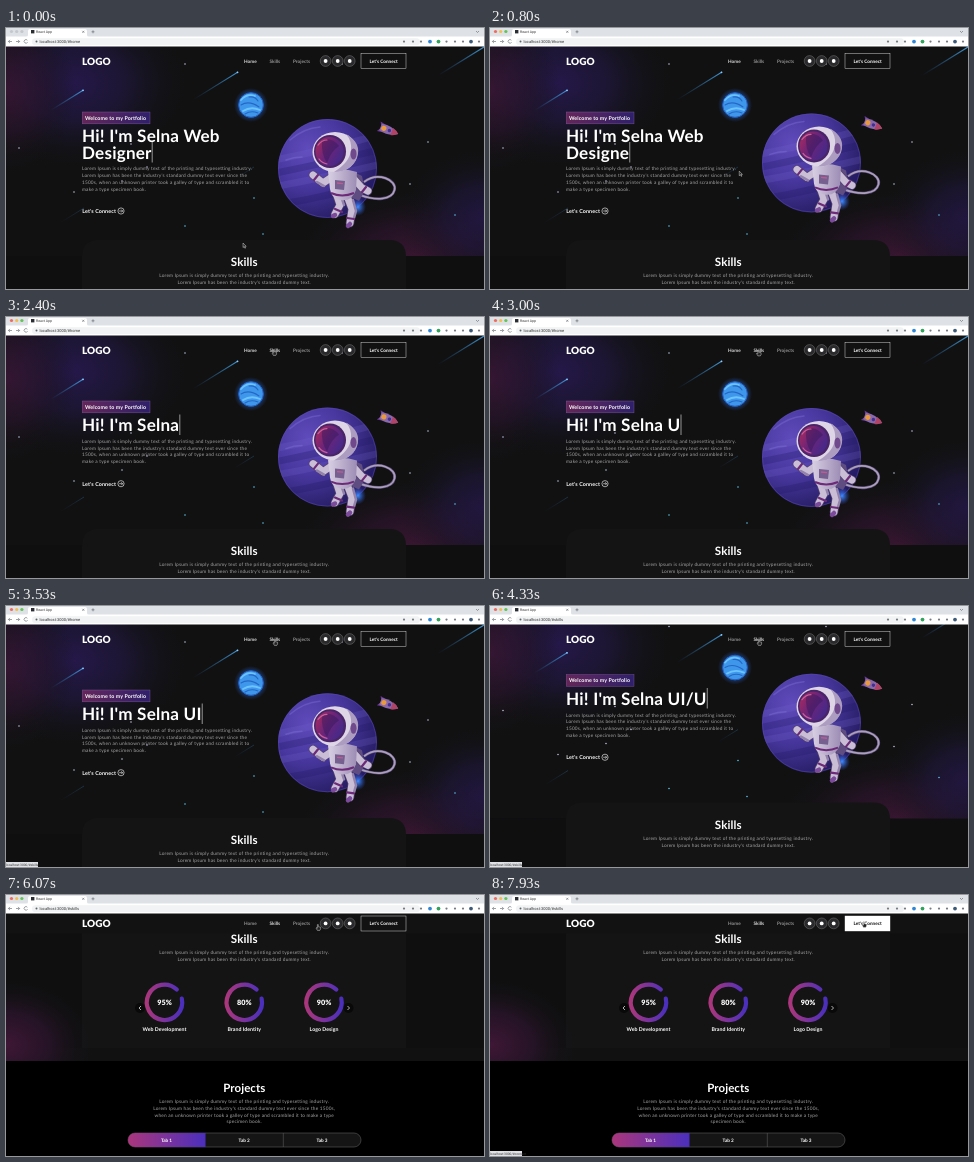
Write an HTML page that moves like this. It is 478 px wide and 261 px high and loops after 8 s.

```html
<!DOCTYPE html>
<html lang="en">
<head>
<meta charset="utf-8">
<title>Portfolio</title>
<style>
html, body { margin: 0; width: 100%; height: 100%; overflow: hidden; background: #0d0d0e; }
svg { display: block; width: 100vw; height: 100vh; }
text { font-family: Lato, "Open Sans", sans-serif; text-rendering: geometricPrecision; white-space: pre; }
.ui text { font-family: Roboto, Arial, sans-serif; }
</style>
</head>
<body>
<svg viewBox="0 0 478 261" preserveAspectRatio="none">
<defs>
  <linearGradient id="brand"><stop stop-color="#aa367c"/><stop offset="1" stop-color="#4a2fbd"/></linearGradient>
  <radialGradient id="violet"><stop stop-color="#25184a"/><stop offset=".45" stop-color="#1f173a" stop-opacity=".8"/><stop offset="1" stop-color="#121214" stop-opacity="0"/></radialGradient>
  <radialGradient id="plum"><stop stop-color="#3f1736"/><stop offset=".5" stop-color="#2a142b" stop-opacity=".8"/><stop offset="1" stop-color="#121214" stop-opacity="0"/></radialGradient>
  <radialGradient id="planet" cx=".3" cy=".3" r=".8"><stop stop-color="#5f4bbb"/><stop offset=".5" stop-color="#46369c"/><stop offset="1" stop-color="#221a5c"/></radialGradient>
  <linearGradient id="visor" x1="0" y1=".2" x2="1" y2=".8"><stop stop-color="#a42a60"/><stop offset=".45" stop-color="#6b2478"/><stop offset="1" stop-color="#3f2a8c"/></linearGradient>
  <linearGradient id="suit"><stop stop-color="#d9d0e4"/><stop offset="1" stop-color="#9c8cb4"/></linearGradient>
  <radialGradient id="halo"><stop offset=".6" stop-color="#2a6ce0" stop-opacity=".5"/><stop offset="1" stop-color="#2a6ce0" stop-opacity="0"/></radialGradient>
  <radialGradient id="jet"><stop stop-color="#3f8cff"/><stop offset="1" stop-color="#2a50d0" stop-opacity="0"/></radialGradient>
  <linearGradient id="tail" x1="0" y1="1" x2="1" y2="0"><stop stop-color="#2b6ca8" stop-opacity="0"/><stop offset="1" stop-color="#45a6e8"/></linearGradient>
  <clipPath id="disc"><circle cx="321.5" cy="140.5" r="49.5"/></clipPath>
  <clipPath id="hero"><path d="M0 0H478V228H0Z"/></clipPath>
</defs>

<g id="page">
  <path d="M0 0H478V228H0Z" fill="#111112"/>
  <path d="M0 228H478V356H0Z" fill="#0f0f10"/>
  <g clip-path="url(#hero)">
    <ellipse cx="68" cy="55" rx="115" ry="85" fill="url(#violet)"/>
    <ellipse cx="0" cy="62" rx="70" ry="85" fill="url(#plum)" opacity=".75"/>
    <ellipse cx="410" cy="228" rx="120" ry="66" fill="url(#plum)" opacity=".85"/>
    <ellipse cx="478" cy="190" rx="85" ry="70" fill="url(#violet)" opacity=".8"/>
    <g id="sky"></g>
  </g>
  <circle cx="245" cy="77" r="17" fill="url(#halo)"/>
  <circle cx="245" cy="77" r="12.3" fill="#3f97ec" stroke="#245fc4"/>
  <g fill="none" stroke-linecap="round">
    <path d="M235 72q6-7 14-4M237 83q8-5 17-1" stroke="#6cc4ff" stroke-width="1.8"/>
    <path d="M235 77q8-5 18 2M239 86q6-4 13-1M243 69q6-1 9 4" stroke="#2567c4" stroke-width="1.1"/>
  </g>

  <g id="float">
    <circle cx="321.5" cy="140.5" r="49.5" fill="url(#planet)"/>
    <g clip-path="url(#disc)" fill="none" stroke-linecap="round">
      <path d="M268 132q45-8 108-26M272 158q45-8 104-22" stroke="#7a68d0" stroke-opacity=".2" stroke-width="7"/>
      <path d="M270 145q50-10 106-24M276 176q50-8 100-24" stroke="#1d1660" stroke-opacity=".28" stroke-width="7"/>
      <path d="M284 112q14-12 30-13M280 132q8-3 16-3" stroke="#8a78e0" stroke-opacity=".35" stroke-width="1.5"/>
    </g>
    <circle cx="321.5" cy="140.5" r="49" fill="none" stroke="#5a48b4" stroke-opacity=".5"/>
    <ellipse cx="352" cy="179" rx="8" ry="9" fill="url(#jet)"/>
    <!-- hose -->
    <g fill="none">
      <path id="hose" d="M358 154C372 143 391 152 388.500 162C386 172 370 173 354 167" stroke="#5d4a78" stroke-width="2.8"/>
      <path d="M358 154C372 143 391 152 388.500 162C386 172 370 173 354 167" stroke="#aa9fbc" stroke-width="1.7"/>
    </g>
    <!-- astronaut -->
    <path d="M346 143l10 5 3 15-6 10-9-4Z" fill="#5f4c80"/>
    <g fill="none" stroke-linecap="round" stroke-linejoin="round">
      <path d="M331 168L334 177L329 186M341 168L346 181L344 195M326 149L317 155L307 147M348 151L356 160L362 163" stroke="#54406f" stroke-width="8.500"/>
      <path d="M331 168L334 177L329 186M341 168L346 181L344 195M326 149L317 155L307 147M348 151L356 160L362 163" stroke="#c9bed6" stroke-width="7"/>
      <path d="M336 171L338 177M347 172L350 183L348 190M318 158L311 154" stroke="#9383ab" stroke-width="2.500"/>
      <path d="M329 181l7 3M341 190l7 1M308 152l4-5M356 164l4-5" stroke="#6d2a78" stroke-width="2.200"/>
      <path d="M329 187l-2 1M344 196l-2 2" stroke="#7b4a9a" stroke-width="4.500"/>
    </g>
    <path d="M322 143Q336 139 351 144L350 162Q346 174 334 172Q325 170 324 161Z" fill="url(#suit)"/>
    <path d="M329 152l10 1-1 9-9-1Z" fill="#75608f"/>
    <path d="M331 155l6 .6" stroke="#c25a92" stroke-width="1.300"/>
    <path d="M325 165q11 5 23 0" fill="none" stroke="#6d2a78" stroke-width="2"/>
    <ellipse cx="329" cy="124" rx="22.500" ry="20" fill="#ded5e6"/>
    <path d="M340 106Q356 115 351 130Q345 144 328 144Q344 134 345 122Q346 113 340 106Z" fill="#ac9cc0"/>
    <ellipse cx="347.500" cy="126" rx="3" ry="5.500" fill="#70488c"/>
    <ellipse cx="324" cy="123.500" rx="16" ry="16.500" fill="#4a2468"/>
    <ellipse cx="323.500" cy="123.500" rx="14" ry="14.500" fill="url(#visor)"/>
    <path d="M316 113q9-5 17 5-8 5-12 17-6-9-5-22Z" fill="#34185c" opacity=".45"/>
    <path d="M312 117q4-5 9-5M313 131q3 4 8 5" stroke="#c8609a" stroke-width="1.200" fill="none" stroke-linecap="round"/>
    <!-- rocket -->
    <g transform="translate(382 102) rotate(22)">
      <path d="M-4-4l-6-1 3 5-3 5 6-1Z" fill="#6a3a94"/>
      <path d="M-8-3.500Q3-6 11 0Q3 6-8 3.500Z" fill="#8a68ac"/>
      <path d="M4-3.800Q8-3 11 0Q8 3 4 3.800Z" fill="#b04468"/>
      <circle cx="-4.500" r="2.600" fill="#e89a3c"/>
      <circle cx="1.500" r="1.700" fill="#43308c"/>
    </g>
  </g>

  <rect x="76.3" y="84" width="67.7" height="11.8" fill="url(#brand)" fill-opacity=".5" stroke="#a070c0" stroke-opacity=".6" stroke-width=".5"/>
  <g id="tagline"></g>
  <g id="heading"></g>
  <path id="caret" d="M0 97.5V118" stroke="#777" stroke-width="1.3"/>
  <g id="intro">
    <g fill="none" stroke="#fff" stroke-width=".6"><circle cx="115" cy="183" r="3.1"/><path d="M113.2 183h3.4m-1.3-1.4l1.4 1.4-1.4 1.4"/></g>
  </g>

  <path d="M76 356V229Q76 212 93 212H383Q400 212 400 229V343H76Z" fill="#141415"/>
  <path d="M0 343H478V356H0Z" fill="#111112"/>
  <svg y="228" width="478" height="128" viewBox="0 228 478 128"><ellipse cx="0" cy="340" rx="88" ry="66" fill="url(#plum)"/></svg>
  <g id="skills"></g>
  <path d="M0 356H478V560H0Z" fill="#000"/>
  <g id="projects">
    <rect x="122" y="428" width="233" height="14" rx="7" fill="#151515" stroke="#5c5c5c" stroke-width=".6"/>
    <path d="M199.5 428H129a7 7 0 0 0 0 14h70.5Z" fill="url(#brand)"/>
    <path d="M277.3 428v14" stroke="#5c5c5c" stroke-width=".6"/>
  </g>
</g>

<path id="bar" d="M0 18H478V38.5H0Z" fill="#121212"/>
<g id="nav">
  <rect x="355" y="25.6" width="45" height="15" fill="none" stroke="#fff" stroke-width=".4"/>
  <rect id="fill" x="355" y="25.6" width="0" height="15" fill="#fff"/>
</g>

<g class="ui" id="chrome">
  <path d="M0 0H478V9H0Z" fill="#dee1e6"/>
  <path d="M0 8.6H478V18.6H0Z" fill="#fff"/>
  <path d="M20 9Q22 9 22 7V3Q22 1 24 1H79Q81 1 81 3V7Q81 9 83 9Z" fill="#fff"/>
  <g id="lights"><circle cx="5.5" cy="3.5" r="1.6"/><circle cx="10.7" cy="3.5" r="1.6"/><circle cx="15.9" cy="3.5" r="1.6"/></g>
  <rect x="25" y="2" width="3.4" height="3.4" fill="#2a2d34"/>
  <path d="M76.3 2.8l2 2m0-2l-2 2M85.5 3.8h3m-1.5-1.5v3M470 3l1.5 1.5L473 3M6 13.5H2.5m1.5-1.6l-1.6 1.6 1.6 1.6M10 13.5h3.5m-1.5-1.6l1.6 1.6-1.6 1.6M21.4 12.3a1.8 1.8 0 1 0 .2 1.8" fill="none" stroke="#5f6368" stroke-width=".6"/>
  <rect x="26" y="10.3" width="388" height="6.8" rx="3.4" fill="#f1f3f4"/>
  <circle cx="30.5" cy="13.6" r="1" fill="#5f6368"/>
  <g id="icons"></g>
</g>
<g class="ui" id="status"><path d="M0 256H32V261H0Z" fill="#dfe1e5"/></g>
<g id="pointer" stroke="#fff" stroke-width=".4" fill="#222">
  <path id="arrow" d="M0-2V2.6L1.1 1.6L1.9 3.3L2.6 3L1.8 1.3H3.2Z"/>
  <path id="hand" d="M-.6-2.4H.3V-.3L2.6.2V2L1.8 3.4H-.6L-2 1L-1.4.6L-.6 1.2Z"/>
</g>
</svg>

<script>
const $ = id => document.getElementById(id);
const NS = 'http://www.w3.org/2000/svg';

function add(parent, tag, attrs) {
  const el = document.createElementNS(NS, tag);
  for (const k in attrs) el.setAttribute(k, attrs[k]);
  return $(parent).appendChild(el);
}
function label(parent, x, y, size, str, attrs = {}) {
  const el = add(parent, 'text', { x, y, 'font-size': size, fill: '#fff', 'font-weight': 700, ...attrs });
  el.textContent = str;
  return el;
}
const mid = { 'text-anchor': 'middle' };
const body = { 'font-weight': 400, fill: '#a6a6a6', 'letter-spacing': .19 };
function lines(parent, x, y, rows, attrs) {
  rows.forEach((row, i) => label(parent, x, y + i * 6.7, 4.78, row, { ...body, ...attrs }));
}

// Sky
[[179,36],[125,116],[13,120],[141,139],[68,164],[116,153],[336,36],[422,114],[404,156]]
  .forEach(([cx, cy]) => add('sky', 'circle', { cx, cy, r: .7, fill: '#dce6ff' }));
[[248,170],[257,206],[179,198],[449,187]]
  .forEach(([cx, cy]) => add('sky', 'circle', { cx, cy, r: .8, fill: '#5fc4e8' }));
[[77.5,62,33],[232,44,45],[478,19,46],[248,139,20],[78,180,24]].forEach(([x, y, len], i) => {
  add('sky', 'path', { d: `M${x} ${y}l${-len} ${len * .62}`, stroke: 'url(#tail)', 'stroke-width': i < 3 ? 1.1 : .6, opacity: i < 3 ? .9 : .4 });
  if (i < 2) add('sky', 'circle', { cx: x - .5, cy: y + .3, r: .9, fill: '#8cc8ff' });
});

// Hero
const first = "Lorem Ipsum is simply dummy text of the printing and typesetting industry.";
const second = "Lorem Ipsum has been the industry's standard dummy text";
label('tagline', 79, 91.7, 5.3, 'Welcome to my Portfolio', { 'letter-spacing': .1 });
const h1 = [114, 130.5].map(y => label('heading', 76, y, 17.1, '', { 'letter-spacing': .2 }));
lines('intro', 76, 142.4, [first, second + ' ever since the',
  '1500s, when an unknown printer took a galley of type and scrambled it to', 'make a type specimen book.']);
label('intro', 76.3, 184.9, 5.4, "Let's Connect", { 'letter-spacing': .1 });

// Skills
label('skills', 238.3, 238, 11.6, 'Skills', { ...mid, 'letter-spacing': .1 });
lines('skills', 238.2, 249.4, [first, second + '.'], mid);
[['95%', 'Web Development', 158.5], ['80%', 'Brand Identity', 238.3], ['90%', 'Logo Design', 318]].forEach(([num, name, x]) => {
  const at = deg => [x + 17.7 * Math.cos(deg * Math.PI / 180), 297.3 + 17.7 * Math.sin(deg * Math.PI / 180)].join(' ');
  add('skills', 'path', { d: `M${at(-12)}A17.7 17.7 0 1 1 ${at(-46)}`, fill: 'none', stroke: 'url(#brand)', 'stroke-width': 4.2, 'stroke-linecap': 'round' });
  label('skills', x, 299.8, 7.3, num, { ...mid, 'font-weight': 900 });
  label('skills', x, 326.2, 5.2, name, { ...mid, 'letter-spacing': .05 });
});
[[134, 1], [342.5, -1]].forEach(([x, s]) => {
  add('skills', 'circle', { cx: x, cy: 303, r: 5, fill: '#09090a' });
  add('skills', 'path', { d: `M${x + s} 301l${-2 * s} 2l${2 * s} 2`, fill: 'none', stroke: '#ddd', 'stroke-width': .8 });
});

// Projects
label('projects', 238.3, 387, 11.5, 'Projects', { ...mid, 'letter-spacing': .05 });
lines('projects', 238.2, 398.1, [first, second + ' ever since the 1500s,',
  'when an unknown printer took a galley of type and scrambled it to make a type', 'specimen book.'], mid);
[160.5, 238.2, 316].forEach((x, i) => label('projects', x, 436.8, 4.7, 'Tab ' + (i + 1), mid));

// Navigation
label('nav', 76, 36.6, 10, 'LOGO', { 'font-weight': 900 });
const [home, skillsLink] = [['Home', 238], ['Skills', 263.5], ['Projects', 287]]
  .map(([name, x]) => label('nav', x, 34.8, 4.7, name, { opacity: .55 }));
[319.6, 331.7, 343.7].forEach(cx => {
  add('nav', 'circle', { cx, cy: 33, r: 5.4, fill: '#2a2a2d', stroke: '#777', 'stroke-width': .5 });
  add('nav', 'circle', { cx, cy: 33, r: 1.9, fill: '#fff' });
});
const cta = label('nav', 377.6, 34.7, 4.7, "Let's Connect", mid);

// Browser
const plain = { 'font-weight': 400, fill: '#333' };
label('chrome', 30, 5, 3.5, 'React App', plain);
const url = label('chrome', 33.6, 15.1, 4, '', plain);
[[398],[407],[415],[424,'#2f86d6'],[432.5,'#2fa45a'],[440.5],[449],[457],[465,'#3c5a78'],[473]]
  .forEach(([x, fill = '#777b80']) => add('icons', 'circle', { cx: x, cy: 13.6, r: fill[1] == '7' ? 1.1 : 1.9, fill }));
const hint = label('status', 0, 259.8, 3.25, '', plain);

// Timing
const clamp = x => Math.max(0, Math.min(1, x));
const ease = x => (x = clamp(x), x < .5 ? 4 * x ** 3 : 1 - 4 * (1 - x) ** 3);
const smooth = x => (x = clamp(x), x * x * (3 - 2 * x));
const host = 'localhost:3000/#';
const path = [[0,237,217],[350,237,217],[1400,268,35],[2700,268,35],[3300,269,36],[4900,269,36],[5900,312,32],[6350,312,32],[7100,374,29],[8000,374,29]];

function pointerAt(t) {
  const i = path.findIndex((p, n) => n && t <= p[0]);
  const [a, b] = [path[i - 1], path[i]];
  const k = smooth((t - a[0]) / (b[0] - a[0]));
  return [a[1] + (b[1] - a[1]) * k, a[2] + (b[2] - a[2]) * k];
}

// Each deletion comes after half the previous wait; typing ticks every 500 ms.
function typed(t) {
  const u = t - 70, word = 'Web Designer';
  if (u < 0) return word;
  if (u < 2000) return word.slice(0, Math.max(0, 11 - Math.floor(-Math.log2(1 - u / 2000))));
  return 'UI/UX Designer'.slice(0, Math.floor((u - 2000) / 500));
}

function setHeading(t) {
  const full = "Hi! I'm Selna " + typed(t);
  h1[0].textContent = full.trimEnd();
  h1[1].textContent = '';
  const wrap = h1[0].getComputedTextLength() > 170;
  if (wrap) {
    const cut = full.lastIndexOf(' ');
    h1[0].textContent = full.slice(0, cut);
    h1[1].textContent = full.slice(cut + 1);
  }
  const x = 76.6 + h1[+wrap].getComputedTextLength();
  $('caret').setAttribute('transform', `translate(${x} ${wrap ? 16.5 : 0})`);
  $('intro').setAttribute('transform', `translate(0 ${wrap ? 0 : -16.3})`);
}

function draw(t) {
  setHeading(t);
  const phase = ((t / 1000 - 1.23) % 3 + 3) % 3;
  $('float').setAttribute('transform', `translate(0 ${-8.6 + 7 * Math.min(phase, 3 - phase)})`);

  $('page').setAttribute('transform', `translate(0 ${-190 * ease((t - 4140) / 700)})`);
  const stuck = smooth((t - 4320) / 320);
  $('nav').setAttribute('transform', `translate(0 ${-4.6 * stuck})`);
  $('bar').setAttribute('opacity', stuck);

  const [x, y] = pointerAt(t);
  const onSkills = y < 40 && x > 262 && x < 276, onButton = x > 356, clicked = t > 4100;
  home.setAttribute('opacity', clicked ? .55 : .85);
  skillsLink.setAttribute('opacity', clicked || onSkills ? .85 : .55);
  const fill = smooth((t - 6830) / 300);
  $('fill').setAttribute('width', 45 * fill);
  cta.setAttribute('fill', fill > .5 ? '#121212' : '#fff');

  $('pointer').setAttribute('transform', `translate(${x} ${y})`);
  const hand = onSkills || x > 311;
  $('hand').setAttribute('opacity', +hand);
  $('arrow').setAttribute('opacity', +!hand);

  url.textContent = host + (clicked ? 'skills' : 'home');
  hint.textContent = host + (onButton ? 'connect' : 'skills');
  $('status').setAttribute('opacity', +(onButton || onSkills && t > 3100));
  const tint = t < 400 ? ['#c4c7cc', '#c4c7cc', '#c4c7cc'] : ['#ee6a5f', '#f5bd4f', '#61c454'];
  [...$('lights').children].forEach((c, i) => c.setAttribute('fill', tint[i]));
}

function frame() {
  draw(performance.now() % 8000);
  requestAnimationFrame(frame);
}
frame();
</script>
</body>
</html>
```
